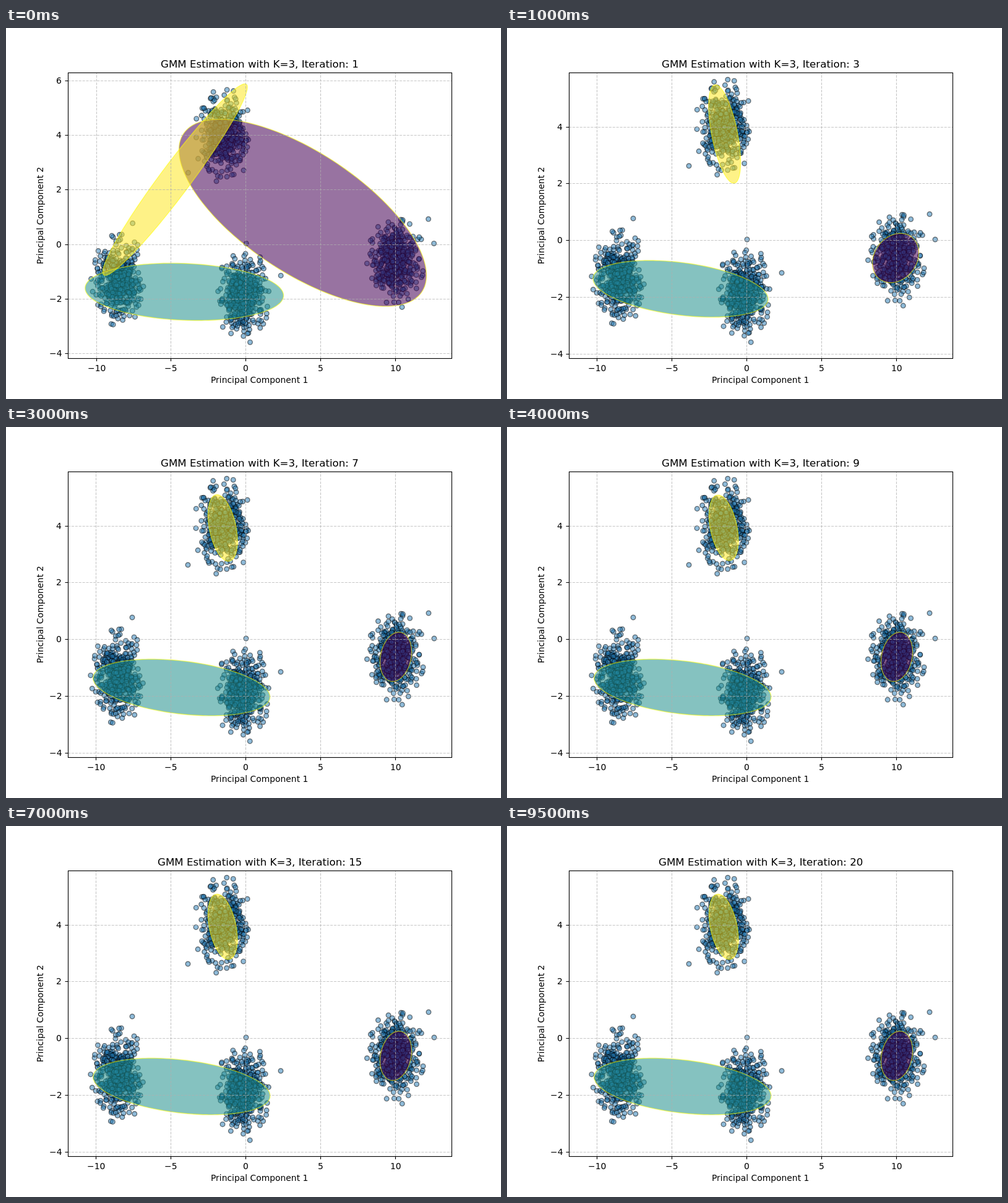
An HTML page with a canvas that plays this animation: 800x600 px, repeating every 10000 ms.

```html
<!DOCTYPE html>
<html>
<head>
<meta charset="utf-8">
<style>
html, body { margin: 0; width: 100%; height: 100%; overflow: hidden; background: #fff; }
canvas { display: block; }
</style>
</head>
<body>
<canvas id="stage" width="800" height="600"></canvas>
<script>
const ctx = document.getElementById('stage').getContext('2d');
const LEFT = 100, RIGHT = 720, TOP = 72, BOTTOM = 534;
const STEP_MS = 500, STEPS = 20;

// Axis mapping: pixel of zero and pixels per unit
const SETTLED = { x0: 387.4, sx: 24.2, y0: 343.7, sy: 45.87, maxY: 4 };
const AXES = [
  { x0: 387.7, sx: 24.15, y0: 350.1, sy: 44.1, maxY: 6 },
  { x0: 377, sx: 23.2, y0: 343.7, sy: 45.87, maxY: 4 }
];

// Normally distributed clouds, in settled pixels, and the loneliest points
const CENTRES = [[351, 161], [183, 404], [382, 430], [630, 370]];
const CLOUD_SIZE = 500, SPREAD_X = 16.7, SPREAD_Y = 28.5, MAX_RADIUS = 2.85;
const STRAYS = [[294, 223], [204, 308], [388, 342], [444, 396], [683, 301], [692, 342]];

// Poses: centre x, y, half width, half height, correlation.
// After the third pose each ellipse decays towards the last one.
const ELLIPSES = [
  { color: '68,1,84', decay: 0, poses: [
    [479.5, 298.8, 200, 151.3, 0.67],
    [560.2, 374.5, 131.5, 67, -0.09],
    [628, 372, 37.5, 39.8, -0.21],
    [630, 371.7, 25.5, 39.8, -0.2]
  ] },
  { color: '33,144,140', decay: 0.45, poses: [
    [288.2, 426.7, 160.3, 46.3, 0.13],
    [263, 422.7, 131, 45.8, 0.38],
    [280.5, 421.8, 141.5, 45.8, 0.36],
    [283.8, 421.2, 143, 45.7, 0.335]
  ] },
  { color: '253,231,37', decay: 0.45, poses: [
    [273.2, 245.2, 116.8, 154.8, -0.966],
    [335.2, 164, 41.3, 56.5, -0.69],
    [351.7, 171.5, 25.8, 79.5, 0.57],
    [350.2, 163, 23.7, 52.7, 0.38]
  ] }
];

let seed = 7;
function random() {
  seed = (seed * 16807) % 2147483647;
  return seed / 2147483647;
}

function makePoints() {
  const points = [...STRAYS];
  for (let i = 0; i < CLOUD_SIZE; i++) {
    for (const [cx, cy] of CENTRES) {
      let radius;
      do radius = Math.sqrt(-2 * Math.log(random())); while (radius > MAX_RADIUS);
      const angle = random() * 2 * Math.PI;
      points.push([
        cx + SPREAD_X * radius * Math.cos(angle),
        cy + SPREAD_Y * radius * Math.sin(angle)
      ]);
    }
  }
  return points;
}
const points = makePoints();

function drawPoints(axes) {
  ctx.fillStyle = 'rgba(31,119,180,0.5)';
  ctx.strokeStyle = 'rgba(0,0,0,0.5)';
  ctx.lineWidth = 1.39;
  for (const [px, py] of points) {
    const x = axes.x0 + (px - SETTLED.x0) * axes.sx / SETTLED.sx;
    const y = axes.y0 + (py - SETTLED.y0) * axes.sy / SETTLED.sy;
    ctx.beginPath();
    ctx.arc(x, y, 3.8, 0, 2 * Math.PI);
    ctx.fill();
    ctx.stroke();
  }
}

function poseAt({ poses, decay }, step) {
  if (step < 3) return poses[step];
  const rest = decay ** (step - 2);
  return poses[3].map((v, i) => v + (poses[2][i] - v) * rest);
}

function drawEllipse(ellipse, step) {
  const [cx, cy, hx, hy, r] = poseAt(ellipse, step);
  const lag = Math.acos(r);
  ctx.beginPath();
  for (let i = 0; i < 180; i++) {
    const t = i * Math.PI / 90;
    ctx.lineTo(cx + hx * Math.cos(t), cy + hy * Math.cos(t - lag));
  }
  ctx.closePath();
  ctx.fillStyle = `rgba(${ellipse.color},0.55)`;
  ctx.strokeStyle = 'rgba(255,255,0,0.55)';
  ctx.lineWidth = 1.39;
  ctx.fill();
  ctx.stroke();
}

function line(color, dash, x1, y1, x2, y2) {
  ctx.strokeStyle = color;
  ctx.lineWidth = 1.11;
  ctx.setLineDash(dash);
  ctx.beginPath();
  ctx.moveTo(x1, y1);
  ctx.lineTo(x2, y2);
  ctx.stroke();
}
const gridLine = (...ends) => line('rgba(176,176,176,0.7)', [4.11, 1.78], ...ends);
const tick = (...ends) => line('#000', [], ...ends);

// align: 0.5 centres the text on x, 1 ends it there
function text(str, x, y, size = 13.89, align = 0.5) {
  ctx.font = `${size}px "DejaVu Sans", sans-serif`;
  ctx.fillStyle = '#000';
  ctx.fillText(str, Math.round(x - align * ctx.measureText(str).width), y);
}

const label = n => String(n).replace('-', '\u2212');
const crisp = v => Math.floor(v) + 0.5;

function drawAxes({ x0, sx, y0, sy, maxY }) {
  for (let n = -10; n <= 10; n += 5) {
    const x = crisp(x0 + n * sx);
    gridLine(x, BOTTOM, x, TOP);
    tick(x, BOTTOM, x, BOTTOM + 5);
    text(label(n), x, 555);
  }
  for (let n = -4; n <= maxY; n += 2) {
    const y = crisp(y0 - n * sy);
    gridLine(LEFT, y, RIGHT, y);
    tick(LEFT - 4.5, y, LEFT, y);
    text(label(n), 90.3, Math.round(y + 4.6), 13.89, 1);
  }
  ctx.strokeRect(LEFT + 0.5, TOP + 0.5, RIGHT - LEFT, BOTTOM - TOP);
  text('Principal Component 1', 410, 574);
  ctx.save();
  ctx.translate(60, 303);
  ctx.rotate(-Math.PI / 2);
  text('Principal Component 2', 0, 0);
  ctx.restore();
}

function draw(step) {
  const axes = AXES[step] || SETTLED;
  ctx.fillStyle = '#fff';
  ctx.fillRect(0, 0, 800, 600);
  drawPoints(axes);
  for (const ellipse of ELLIPSES) drawEllipse(ellipse, step);
  drawAxes(axes);
  text(`GMM Estimation with K=3, Iteration: ${step + 1}`, 410, 64, 16.67);
}

let shown = -1;
function frame() {
  const step = Math.floor(performance.now() / STEP_MS) % STEPS;
  if (step !== shown) draw(shown = step);
  requestAnimationFrame(frame);
}
frame();
</script>
</body>
</html>
```
